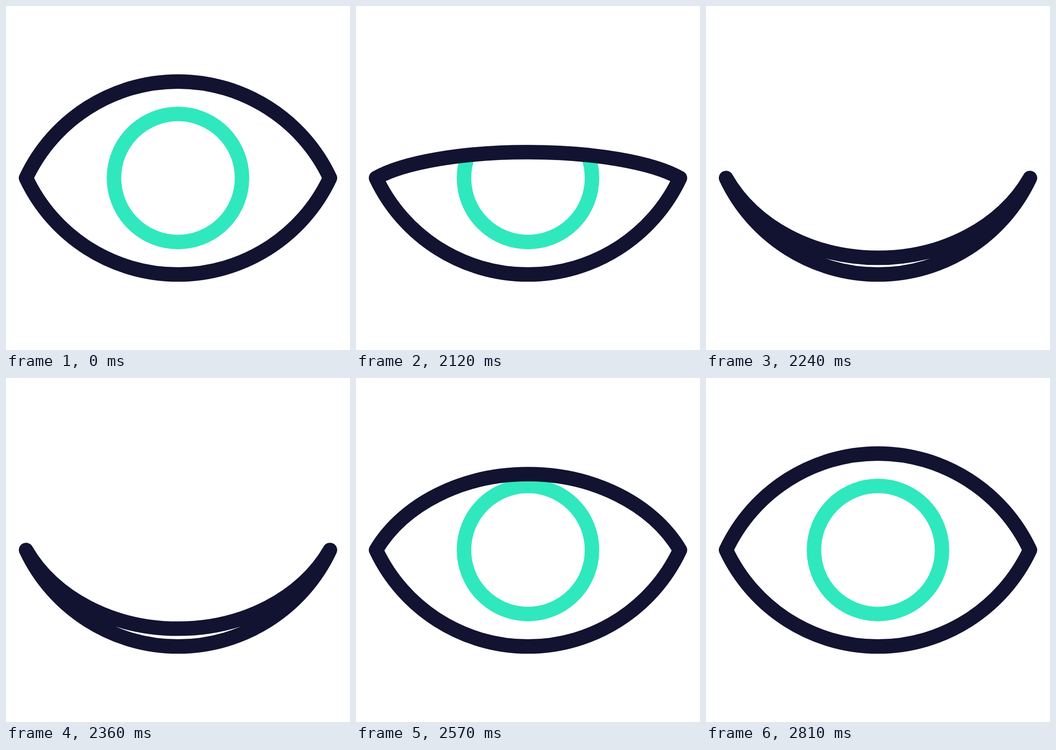
An HTML page for the animation above (2.84 s loop, 748x748 px).

```html
<!DOCTYPE html>
<html lang="en">
<head>
<meta charset="utf-8">
<title>Blinking eye</title>
<style>
  html, body { margin: 0; width: 100%; height: 100%; overflow: hidden; background: #fff; }
  svg { display: block; width: 748px; height: 748px; }
  svg * { fill: none; stroke-width: 31.5; stroke-linejoin: round; stroke-linecap: round; }
  #iris { stroke: #30e8bd; }
  #eye { stroke: #121331; }
  #opening path { fill: #000; }
</style>
</head>
<body>
<svg viewBox="0 0 748 748">
  <clipPath id="opening"><path id="gap"/></clipPath>
  <g clip-path="url(#opening)"><circle id="iris" cx="374" cy="374" r="139.2"/></g>
  <path id="eye"/>
</svg>
<script>
const LOOP = 2840, STEP = 30;
const CLOSE_AT = 2000, OPEN_AT = 2293, DONE_AT = 2807;
const MID = 374, HALF = 330.4, RISE = 209.8;
const gap = document.getElementById('gap');
const eye = document.getElementById('eye');

const smooth = s => s * s * (3 - 2 * s);

// Same as cubic-bezier(.333, 0, 0, 1)
function easeOpen(x) {
  let lo = 0, hi = 1;
  for (let i = 0; i < 30; i++) {
    const s = (lo + hi) / 2;
    if (s * (1 - s) ** 2 + s ** 3 < x) lo = s; else hi = s;
  }
  return smooth(lo);
}

// 0 = wide open, 1 = shut
function closure(t) {
  if (t <= CLOSE_AT || t >= DONE_AT) return 0;
  if (t < OPEN_AT) return smooth((t - CLOSE_AT) / (OPEN_AT - CLOSE_AT));
  return 1 - easeOpen((t - OPEN_AT) / (DONE_AT - OPEN_AT));
}

// Arc between the corners; dir is 1 from left to right, bend is -1 up to 1 down
function lid(dir, bend) {
  const x = d => MID + dir * d;
  const corner = MID + bend * 128, apex = MID + bend * RISE;
  return `C${x(60 - HALF)} ${corner} ${x(-141.5)} ${apex} ${MID} ${apex}` +
         `C${x(141.5)} ${apex} ${x(HALF - 60)} ${corner} ${x(HALF)} ${MID}`;
}

function draw(now) {
  const t = Math.floor((now % LOOP - CLOSE_AT) / STEP) * STEP + CLOSE_AT;
  const d = `M${MID - HALF} ${MID}` + lid(1, 2 * closure(t) - 1) + lid(-1, 1) + 'Z';
  gap.setAttribute('d', d);
  eye.setAttribute('d', d);
}

const start = performance.now();
function tick() {
  draw(performance.now() - start);
  requestAnimationFrame(tick);
}
tick();
</script>
</body>
</html>
```
